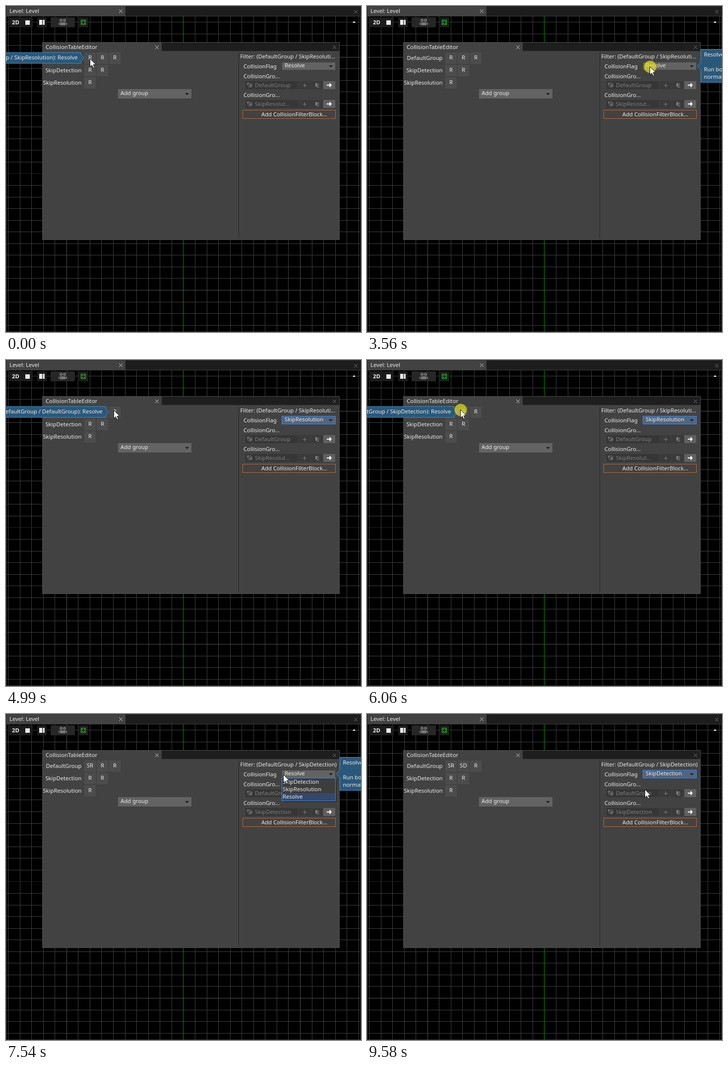
An HTML page with a canvas for the animation above (9610 ms loop, 716 by 659 pixels).

```html
<!DOCTYPE html>
<html lang="en">
<head>
<meta charset="utf-8">
<title>Collision table editor</title>
<style>
html, body { margin: 0; width: 100%; height: 100%; overflow: hidden; background: #000; }
canvas { display: block; }
</style>
</head>
<body>
<canvas id="stage" width="716" height="659"></canvas>
<script>
const ctx = document.getElementById('stage').getContext('2d');
const LOOP = 9610;
const WHITE = '#ececec', PANEL = '#424242', DIM = '#7e7e7e';
const GROUPS = ['DefaultGroup', 'SkipDetection', 'SkipResolution'];
const FLAGS = ['SkipDetection', 'SkipResolution', 'Resolve'];
const SHORT = { SkipDetection: 'SD', SkipResolution: 'SR', Resolve: 'R' };
const HELP = {
  SkipDetection: ["Don't check"],
  SkipResolution: ["Don't resolve", 'run solver'],
  Resolve: ['Run both', 'normally']
};

// Pointer path: time, x, y, easing towards this point
const smooth = u => u * u * (3 - 2 * u);
const speedUp = u => u ** 1.4;
const slowDown = u => 1 - (1 - u) ** 2;
const PATH = [
  [0, 169.5, 106.5], [2130, 169.5, 106.5], [2540, 528, 129, speedUp], [3050, 571, 123, slowDown],
  [3700, 571, 123], [4070, 569, 153, smooth], [4580, 569, 153], [4990, 218, 102, speedUp],
  [5170, 173, 104, slowDown], [5370, 173, 104], [5450, 188.5, 100.5, smooth], [6520, 188.5, 100.5],
  [6750, 475, 117, speedUp], [7260, 560, 123, slowDown], [8050, 560, 123], [8280, 562, 140, smooth],
  [9430, 562, 140], [9580, 560.5, 153, smooth], [LOOP, 560.5, 153]
];
const PRESSES = [[880, 1010], [3560, 3660], [4300, 4400], [6060, 6240], [7440, 7540], [8740, 8920]];
const during = (t, a, b) => t >= a && t < b;

function pointerAt(t) {
  const i = PATH.findIndex(key => key[0] > t);
  const [t0, x0, y0] = PATH[i - 1], [t1, x1, y1, ease = u => u] = PATH[i];
  const k = ease((t - t0) / (t1 - t0));
  return { x: Math.round(x0 + (x1 - x0) * k), y: Math.round(y0 + (y1 - y0) * k) };
}

function rect(x, y, w, h, color) {
  ctx.fillStyle = color;
  ctx.fillRect(x, y, w, h);
}

function frame(x, y, w, h, color) {
  ctx.strokeStyle = color;
  ctx.lineWidth = 1;
  ctx.strokeRect(x + 0.5, y + 0.5, w - 1, h - 1);
}

function text(str, x, y, color = WHITE, align = 'left', weight = '') {
  ctx.font = `${weight} 11.25px "Noto Sans", "Open Sans", sans-serif`;
  ctx.textAlign = align;
  ctx.fillStyle = color;
  ctx.fillText(str, x, y);
}

function shape(points, fill, stroke) {
  ctx.beginPath();
  points.forEach(([x, y]) => ctx.lineTo(x, y));
  ctx.closePath();
  ctx.fillStyle = fill;
  ctx.fill();
  if (stroke) {
    ctx.strokeStyle = stroke;
    ctx.lineWidth = 1;
    ctx.stroke();
  }
}

function line(points, color, width = 1) {
  ctx.beginPath();
  points.forEach(([x, y], i) => i % 2 ? ctx.lineTo(x, y) : ctx.moveTo(x, y));
  ctx.strokeStyle = color;
  ctx.lineWidth = width;
  ctx.stroke();
}

function dot(x, y, r, color) {
  ctx.beginPath();
  ctx.arc(x, y, r, 0, Math.PI * 2);
  ctx.fillStyle = color;
  ctx.fill();
}

function cross(x, y, color) {
  line([[x - 3.5, y - 3.5], [x + 3.5, y + 3.5], [x + 3.5, y - 3.5], [x - 3.5, y + 3.5]], color);
}

function combo(x, y, w, h, label, focused) {
  rect(x, y, w, h, focused ? '#506580' : '#636363');
  if (focused) frame(x - 1, y - 1, w + 2, h + 2, '#3c86e4');
  text(label, x + 5, Math.round(y + h / 2 + 2));
  const ax = x + w - 9, ay = y + h / 2 - 1.5;
  shape([[ax - 4, ay], [ax + 4, ay], [ax, ay + 4]], '#1c1c1c');
}

function drawGrid() {
  rect(0, 0, 716, 659, '#000');
  for (let k = -15; k <= 15; k++) {
    const offset = k * 23.56, gray = k % 10 ? '#3e3e3e' : '#505050';
    rect(Math.floor(357.9 + offset), 21, 1, 637, gray);
    if (Math.abs(k) < 14) rect(2, Math.floor(338.9 + offset), 712, 1, gray);
  }
  rect(2, 338, 712, 1, '#6a0000');
  rect(357, 21, 1, 637, '#009600');
}

function drawLevel() {
  drawGrid();
  rect(0, 0, 716, 20, '#1d1d1d');
  rect(0, 0, 716, 1, '#303030');
  rect(1, 1, 240, 20, PANEL);
  rect(0, 20, 716, 1, PANEL);
  frame(0, 20, 716, 639, '#3d3d3d');
  text('Level: Level', 7, 14);
  cross(231.5, 10.5, '#d0d0d0');
  cross(705.5, 11.5, '#777');

  rect(6, 23, 48, 20, '#1c1c1c');
  text('2D', 12, 37, WHITE, 'left', 'bold');
  rect(39, 29, 9, 9, WHITE);
  rect(63, 23, 19, 20, '#1c1c1c');
  rect(67, 28, 6, 10, WHITE);
  rect(74, 28, 4, 10, '#d4d4d4');
  rect(90, 23, 49, 20, '#272727');
  dot(111, 29, 3, '#777');
  dot(118, 29, 3, '#777');
  dot(111, 29, 1, '#272727');
  dot(118, 29, 1, '#272727');
  rect(109, 33, 11, 6, '#777');
  shape([[120, 36], [123, 33], [123, 39]], '#777');
  rect(106, 34, 2, 4, '#777');
  rect(147, 23, 19, 20, '#1c1c1c');
  frame(151, 28, 10, 10, '#22cc22');
  for (const x of [153, 157]) for (const y of [30, 34]) rect(x, y, 2, 2, '#22cc22');
  shape([[699, 34], [705, 34], [702, 30.5]], WHITE);
}

function groupField(y, label) {
  rect(483, y, 106, 16, '#363636');
  dot(492, y + 8, 5, '#5e5e5e');
  dot(492, y + 8, 3.5, '#363636');
  dot(493.5, y + 9, 3, '#666');
  rect(486, y + 3, 4, 4, '#666');
  text(label, 502, y + 12, DIM);
  rect(590, y, 24, 16, '#3a3a3a');
  rect(615, y, 24, 16, '#3a3a3a');
  line([[598.5, y + 8.5], [606.5, y + 8.5], [602.5, y + 4.5], [602.5, y + 12.5]], DIM);
  rect(624, y + 4, 3, 7, DIM);
  frame(627, y + 5, 4, 8, DIM);
  rect(640, y, 24, 16, '#606060');
  line([[647, y + 8], [656, y + 8], [652.5, y + 4.5], [656, y + 8.5], [652.5, y + 11.5], [656, y + 7.5]], '#fff', 2);
}

function drawEditor(s) {
  rect(73, 73, 600, 400, PANEL);
  rect(314, 74, 358, 17, '#1e1e1e');
  frame(73, 73, 600, 400, '#4b4b4b');
  text('CollisionTableEditor', 80, 87);
  cross(304.5, 83.5, '#d0d0d0');
  cross(662.5, 83.5, '#777');
  rect(469, 94, 1, 376, '#272727');

  GROUPS.forEach((name, row) => {
    const y = 94 + row * 25;
    text(name, 152.5, y + 15, WHITE, 'right');
    for (let col = 0; col < 3 - row; col++) {
      const x = 158 + col * 25;
      rect(x, y, 23, 23, '#4c4c4c');
      text(row ? 'R' : SHORT[s.cells[col]], x + 11.5, y + 14, WHITE, 'center');
    }
  });
  combo(226, 168, 148, 19, 'Add group');

  const name = s.second ? 'SkipDetection)' : 'SkipResoluti...';
  text('Filter: (DefaultGroup / ' + name, 472.5, 106);
  text('CollisionFlag', 479, 126);
  combo(557, 114, 107, 15, s.flag, s.focused);
  text('CollisionGro...', 479, 146);
  groupField(152, 'DefaultGroup');
  text('CollisionGro...', 479, 184);
  groupField(190, s.second ? 'SkipDetection' : 'SkipResolut...');
  frame(477, 210, 188, 18, '#b56a3c');
  text('Add CollisionFilterBlock...', 515, 223);
}

function drawMenu(hovered) {
  rect(559, 132, 108, 46, 'rgba(0,0,0,.3)');
  rect(556, 129, 109, 47, '#3d3d3d');
  FLAGS.forEach((flag, i) => {
    const y = 130 + i * 15;
    if (i === hovered) rect(557, y, 107, 15, '#546b83');
    else if (i === 2) rect(557, y, 107, 15, '#34486b');
    text(flag, 558, y + 11);
  });
  frame(556, 129, 109, 47, '#3c86e4');
}

// Callout whose arrow touches x; side -1 puts the body on the left
function callout(x, cy, lines, side) {
  text('', 0, 0);
  const width = Math.max(...lines.map(l => ctx.measureText(l).width)) + 12;
  const half = lines.length * 7.5 + 3.5;
  const near = x + 7 * side, far = near + width * side;
  shape([[x, cy], [near, cy - 8], [near, cy - half], [far, cy - half],
    [far, cy + half], [near, cy + half], [near, cy + 8]], '#2a587a', '#4090c4');
  const left = Math.min(near, far) + 6;
  lines.forEach((l, i) => text(l, left, Math.floor(cy - lines.length * 7.5 + 11 + i * 15)));
}

function drawCallout(p, s) {
  const help = flag => [flag, '', ...HELP[flag]];
  const col = Math.floor((p.x - 157) / 25);
  if (col >= 0 && col < 3 && p.y > 93 && p.y < 118) {
    const title = `Filter: (DefaultGroup / ${GROUPS[2 - col]}):`;
    const flag = s.cells[col];
    const lines = flag === 'Resolve' ? [`${title} ${flag}`] : [title, flag];
    callout(157.5 + col * 25, 105, lines, -1);
  } else if (s.hovered >= 0) {
    callout(668.5, 138 + s.hovered * 15, help(FLAGS[s.hovered]), 1);
  } else if (p.x > 556 && p.y > 112 && p.y < 130) {
    callout(666.5, 121, help(s.flag), 1);
  }
}

function drawPointer(p, pressed) {
  if (pressed) dot(p.x, p.y, 12.5, 'rgba(225,220,25,.72)');
  const arrow = [[0, 0], [0, 16.5], [3.8, 13], [6.3, 18.8], [9, 17.6], [6.5, 12], [11.5, 11.8]];
  shape(arrow.map(([x, y]) => [p.x - 0.5 + x, p.y - 0.5 + y]), '#fff', '#111');
}

function draw(t) {
  const p = pointerAt(t);
  const second = t >= 6160, chosen = t >= 4400, chosenSecond = t >= 8840;
  const open = during(t, 3610, 4400) || during(t, 7490, 8840);
  const lingering = during(t, 4400, 4600) || during(t, 8840, 9450);
  const s = {
    second,
    cells: [chosen ? 'SkipResolution' : 'Resolve', chosenSecond ? 'SkipDetection' : 'Resolve', 'Resolve'],
    focused: second ? chosenSecond : chosen,
    hovered: (open || lingering) && p.y >= 130 ? Math.floor((p.y - 130) / 15) : -1
  };
  s.flag = s.cells[second ? 1 : 0];
  drawLevel();
  drawEditor(s);
  if (open) drawMenu(s.hovered);
  drawCallout(p, s);
  drawPointer(p, PRESSES.some(([a, b]) => during(t, a, b)));
}

const start = performance.now();
function tick() {
  draw((performance.now() - start) % LOOP);
  requestAnimationFrame(tick);
}
tick();
</script>
</body>
</html>
```
